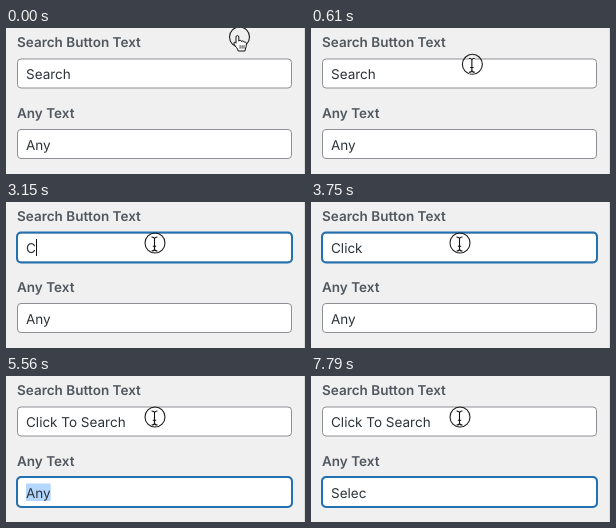
Animation, 299 px wide and 146 px high, one loop 8000 ms. Source, as an HTML page:

```html
<!DOCTYPE html>
<html lang="en">
<head>
<meta charset="utf-8">
<title>Text settings</title>
<style>
  html, body { margin: 0; width: 100%; height: 100%; overflow: hidden; background: #f0f0f0; }
  svg { display: block; width: 299px; height: 146px; }
  text {
    font: 400 13.5px Inter, Roboto, sans-serif;
    fill: #2c3338;
    white-space: pre;
    text-rendering: geometricPrecision;
  }
  .label { font-weight: 600; fill: #50575e; }
  .box { fill: #fff; stroke: #8c8f94; }
  .focus { fill: none; stroke: #2271b1; stroke-width: 2; }
  .mark { fill: #b3d7ff; }
  .caret { fill: #111; }
  .ring { fill: none; stroke: #1c1c1c; stroke-width: 1.1; }
  .halo { fill: none; stroke: #fff; stroke-width: 2.6; }
  .beam { fill: none; stroke: #111; stroke-width: 1.1; }
  .hand { fill: #fff; stroke: #111; stroke-linejoin: round; }
</style>
</head>
<body>
<svg viewBox="0 0 299 146">
  <defs>
    <path id="beam" d="M-3-7Q0-7 0-5Q0-7 3-7M0-5V5M-3 7Q0 7 0 5Q0 7 3 7M-1.7 2.2H1.7"/>
  </defs>
  <rect x="298" width="1" height="146" fill="#dcdcde"/>
  <text class="label" x="11" y="19">Search Button Text</text>
  <text class="label" x="11" y="90">Any Text</text>
  <g id="fields"></g>
  <g id="cursor">
    <circle class="ring" r="10"/>
    <g id="pointer">
      <path class="hand" d="M-3.5 0a1.4 1.4 0 0 1 2.8 0V4.2q.3-1 1.4-.9q1.2.1 1.3 1.2q.4-.7 1.4-.5q1.2.2 1.2 1.3q.5-.5 1.3-.2q1.1.4 1 1.7q0 3-1 5.2l-.4 2h-6.8q-.3-1.8-1.6-3.4q-1.5-1.6-2.4-3.4q-.6-1.4.2-2q.9-.4 1.6 1Z"/>
      <path d="M.6 8.2v3.4M2.6 8.2v3.4M4.5 8.2v3.4" fill="none" stroke="#111" stroke-width=".8"/>
    </g>
    <g id="ibeam" transform="translate(-.5 1)">
      <use href="#beam" class="halo"/>
      <use href="#beam" class="beam"/>
    </g>
  </g>
</svg>
<script>
const LOOP = 8000;
const TEXT_X = 20;
const $ = id => document.getElementById(id);

function add(parent, tag, attrs) {
  const node = document.createElementNS('http://www.w3.org/2000/svg', tag);
  for (const key in attrs) node.setAttribute(key, attrs[key]);
  return parent.appendChild(node);
}

function makeField(y, lineTop) {
  const g = $('fields');
  add(g, 'rect', { class: 'box', x: 11.5, y: y + .5, width: 274, height: 29, rx: 3.5 });
  return {
    focus: add(g, 'rect', { class: 'focus', x: 11, y, width: 275, height: 30, rx: 4 }),
    mark: add(g, 'rect', { class: 'mark', x: TEXT_X, y: lineTop, height: 17.5 }),
    text: add(g, 'text', { x: TEXT_X, y: y + 20.5, 'xml:space': 'preserve' }),
    caret: add(g, 'rect', { class: 'caret', y: lineTop, width: 1, height: 17 })
  };
}

const fields = [makeField(30.5, 37), makeField(101, 107.5)];

// [time, content]: a trailing "|" shows the caret, a leading "#" selects all
const typing = [
  [[0, 'Search'], [950, 'Search|'], [1520, 'Search'], [2080, 'Search|'], [2650, 'Search'],
   [2800, '#Search'], [3150, 'C|'], [3180, 'C'], [3270, 'Cl|'], [3360, 'Cli|'],
   [3450, 'Clic|'], [3540, 'Click|'], [3660, 'Click |'], [3750, 'Click '],
   [3900, 'Click T|'], [4050, 'Click To|'], [4130, 'Click To |'], [4310, 'Click To '],
   [4610, 'Click To S|'], [4820, 'Click To Se|'], [4890, 'Click To Sea'],
   [4960, 'Click To Sea|'], [5030, 'Click To Sear|'], [5240, 'Click To Searc|'],
   [5360, 'Click To Search|'], [5500, 'Click To Search']],
  [[0, 'Any'], [5500, '#Any'], [7210, 'S|'], [7240, 'S'], [7410, 'Se|'],
   [7500, 'Sel|'], [7590, 'Sele|'], [7760, 'Selec|'], [7790, 'Selec']]
];

const focusSteps = [
  [[0, 0], [950, 1], [5500, .5], [5560, 0]],
  [[0, 0], [5500, .5], [5560, 1]]
];

function valueAt(steps, t) {
  let value;
  for (const [start, v] of steps) if (t >= start) value = v;
  return value;
}

function drawField(field, content, focus) {
  field.text.textContent = content.replace(/[#|]/g, '');
  const width = field.text.getComputedTextLength();
  field.focus.setAttribute('opacity', focus);
  field.mark.setAttribute('width', content.startsWith('#') ? width : 0);
  field.caret.setAttribute('x', Math.round(TEXT_X + width));
  field.caret.setAttribute('opacity', content.endsWith('|') ? 1 : 0);
}

function drawCursor(t) {
  const step = Math.max(0, Math.min(16, Math.floor((t - 300) / 27.3) + 1));
  const p = .5 - .5 * Math.cos(Math.PI * step / 16);
  const x = 233.5 - 84.5 * p;
  const y = 9 + 32 * p;
  const overInput = y > 30.5;
  $('cursor').setAttribute('transform', `translate(${x} ${y})`);
  $('pointer').setAttribute('opacity', overInput ? 0 : 1);
  $('ibeam').setAttribute('opacity', overInput ? 1 : 0);
}

const origin = performance.now();

function draw() {
  const t = (performance.now() - origin) % LOOP;
  fields.forEach((field, i) => drawField(field, valueAt(typing[i], t), valueAt(focusSteps[i], t)));
  drawCursor(t);
  requestAnimationFrame(draw);
}
draw();
</script>
</body>
</html>
```
